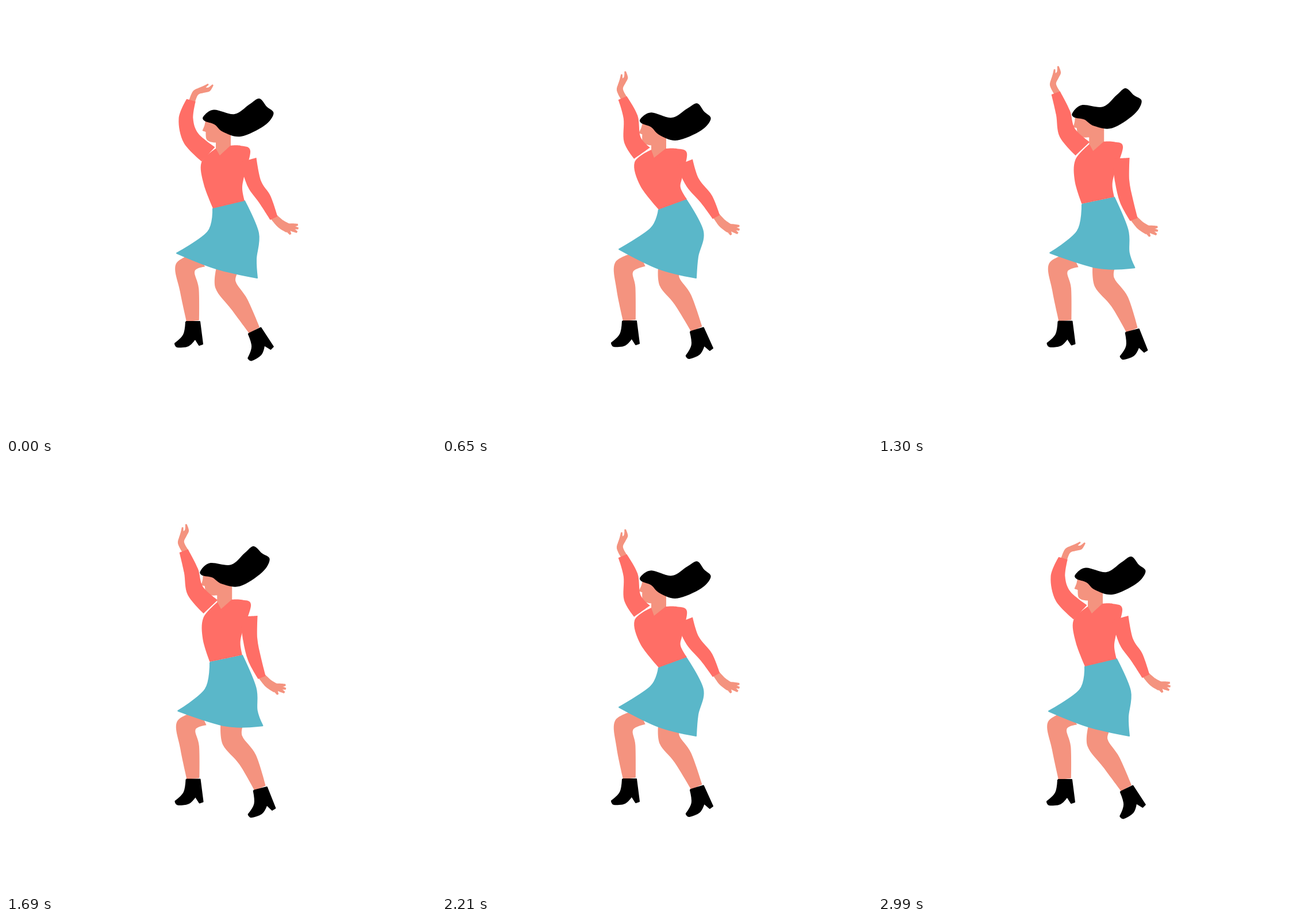
Recreate the animation shown at these times as an HTML page with a canvas. Size 748 by 748 pixels, loop 3.12 s.

```html
<!DOCTYPE html>
<html lang="en">
<head>
<meta charset="utf-8">
<title>Dancer</title>
<style>
  html, body { margin: 0; width: 100%; height: 100%; overflow: hidden; background: #fff; }
  canvas { display: block; width: 100%; height: 100%; }
</style>
</head>
<body>
<canvas id="stage"></canvas>
<script>
const SKIN = '#f4937f', SHIRT = '#ff6e66', SKIRT = '#5ab7c9', BLACK = '#000';
const SIZE = 748, STEP = 130, STEPS = 6;

// Three key poses. Limbs list their joints from the body outwards;
// head and turns are in degrees.
const LOW = {
  torso: '415,339 411,318 414,297 425,252 408,243 390,243 372,260 365,248 340,272 344,310 360,352',
  skirt: '360,352 415,339 439,395 435,440 437,473 366,457 297,430 351,393',
  neck: '378,215 378,264',
  head: '343.5,192', headTurn: '0',
  armL: '352,258 322,230 313,196 322,164', handTurnL: '0',
  armR: '421,268 432,309 450,336 466,369', handTurnR: '0',
  legL: '340,441 312,455 319,494 325,548', bootTurnL: '0',
  legR: '386,457 382,485 406,519 432,564', bootTurnR: '-26'
};
const HIGH = {
  torso: '408,327 405,308 409,288 427,240 413,231 395,230 376,246 370,234 346,264 341,300 350,338',
  skirt: '351,339 408,328 431,385 438,420 454,441 398,455 301,429 343,391',
  neck: '382,200 382,250',
  head: '337,184.5', headTurn: '-9',
  armL: '357,246 331,218 324,183 306,148', handTurnL: '-62',
  armR: '423,264 423,304 428,340 440,372', handTurnR: '3',
  legL: '345,442 315,455 320,492 326,547', bootTurnL: '0',
  legR: '399,450 404,478 432,511 450,564', bootTurnR: '-5'
};
const BACK = {
  torso: '426,336 415,316 418,297 426,256 408,248 389,248 369,264 364,250 335,272 345,313 377,354',
  skirt: '377,354 425,337 454,392 445,436 442,473 377,457 308,423 363,387',
  neck: '377,225 377,264',
  head: '345.5,196', headTurn: '2.5',
  armL: '348,256 331,232 328,193 314,160', handTurnL: '-49',
  armR: '422,272 436,307 460,336 477,367', handTurnR: '6',
  legL: '348,440 317,454 320,491 326,547', bootTurnL: '0',
  legR: '396,455 396,480 419,511 443,562', bootTurnR: '-17'
};

const points = text => text.split(' ').map(p => p.split(',').map(Number));
const mix = (a, b, t) => a.map((p, i) => p.map((v, k) => v + (b[i][k] - v) * t));

// Head and arms reach the high pose sooner than the rest of the body.
function poseAt(step) {
  const pose = {};
  for (const name in LOW) {
    const lead = /head|arm|hand/.test(name) ? 4 : 2;
    const rise = 1 - (1 - Math.min(step, 3) / 3) ** lead;
    const lean = (Math.max(step - 3, 0) / 2) ** 1.3;
    const [low, high, back] = [LOW, HIGH, BACK].map(key => points(key[name]));
    pose[name] = mix(mix(low, high, rise), back, lean);
  }
  return pose;
}

const canvas = document.getElementById('stage');
const ctx = canvas.getContext('2d');
const scale = window.devicePixelRatio || 1;
canvas.width = canvas.height = SIZE * scale;
ctx.scale(scale, scale);
ctx.lineJoin = 'round';
ctx.lineWidth = 2;

// Closed smooth curve through the points, with sharp turns at the corners.
function blob(color, pts, corners = [], rounded = false) {
  const n = pts.length;
  const handle = (i, sign) => {
    const p = pts[i];
    if (corners.includes(i)) return p;
    const a = pts[(i + n - 1) % n], b = pts[(i + 1) % n];
    return p.map((v, k) => v + sign * (b[k] - a[k]) / 6);
  };
  ctx.beginPath();
  ctx.moveTo(...pts[0]);
  for (let i = 0; i < n; i++) {
    const j = (i + 1) % n;
    ctx.bezierCurveTo(...handle(i, 1), ...handle(j, -1), ...pts[j]);
  }
  ctx.fillStyle = ctx.strokeStyle = color;
  ctx.fill();
  if (rounded) ctx.stroke();
}

// Tapered shape around a chain of joints.
function limb(color, joints, radii) {
  const n = joints.length;
  const side = sign => joints.map(([x, y], i) => {
    const a = joints[Math.max(i - 1, 0)], b = joints[Math.min(i + 1, n - 1)];
    const dx = b[0] - a[0], dy = b[1] - a[1], r = sign * radii[i] / Math.hypot(dx, dy);
    return [x + dy * r, y - dx * r];
  });
  blob(color, [...side(1), ...side(-1).reverse()], [0, n - 1, n, 2 * n - 1]);
}

// Draws in a frame moved to a joint and turned there.
function attach([x, y], [[turn]], draw) {
  ctx.save();
  ctx.translate(x, y);
  ctx.rotate(turn * Math.PI / 180);
  draw();
  ctx.restore();
}

function raisedHand() {
  limb(SKIN, points('1,4 8,-13 22,-18 31,-19 38,-27'), [5.5, 5.5, 5, 3.5, 1.3]);
  limb(SKIN, points('15,-17 23,-23 30,-28'), [5, 2.5, 1.3]);
}

function openHand() {
  limb(SKIN, points('-2,-4 12,10 26,18'), [6, 7.5, 8]);
  for (const [degrees, length] of [[-7, 22], [10, 23], [27, 23], [58, 17]]) {
    const angle = degrees * Math.PI / 180;
    const reach = d => [20 + d * Math.cos(angle), 14 + d * Math.sin(angle)];
    limb(SKIN, [reach(0), reach(length / 2), reach(length)], [4, 3.5, 1.6]);
  }
}

function boot() {
  blob(BLACK, points('-12,1 12,1 17,40 11,42 4,31 -8,43 -27,45 -31,39 -16,24'), [0, 1, 2, 3, 4, 7], true);
}

function head() {
  blob(SKIN, points('4,4 2,15 -2,25 4,27 5,39 11,44 24,46 42,13'), [0, 2, 3, 6, 7]);
  blob(BLACK, points('0,0 18,-11.5 54,-4 80,-21 97,-31 110,-17 122,-5 106,16 65,35 34,27 19,14 2,8'));
}

function draw(pose) {
  const last = name => pose[name][pose[name].length - 1];
  ctx.clearRect(0, 0, SIZE, SIZE);

  attach(last('armL'), pose.handTurnL, raisedHand);
  attach(last('armR'), pose.handTurnR, openHand);
  limb(SKIN, pose.legL, [14, 17.5, 16.5, 11]);
  limb(SKIN, pose.legR, [20, 18.5, 16.5, 10.5]);
  attach(last('legL'), pose.bootTurnL, boot);
  attach(last('legR'), pose.bootTurnR, boot);

  limb(SKIN, pose.neck, [13, 13]);
  attach(pose.head[0], pose.headTurn, head);
  blob(SKIRT, pose.skirt, [0, 1, 4, 6], true);
  blob(SHIRT, pose.torso, [0, 5, 6, 7, 10]);
  limb(SHIRT, pose.armL, [17, 15, 12.5, 8]);
  limb(SHIRT, pose.armR, [15, 12.5, 11.5, 7]);
}

const start = performance.now();
let shown = -1;
function tick() {
  const beat = Math.floor((performance.now() - start) / STEP) % (2 * STEPS);
  const step = Math.min(beat, 2 * STEPS - 1 - beat);
  if (step !== shown) draw(poseAt(shown = step));
  requestAnimationFrame(tick);
}
tick();
</script>
</body>
</html>
```
